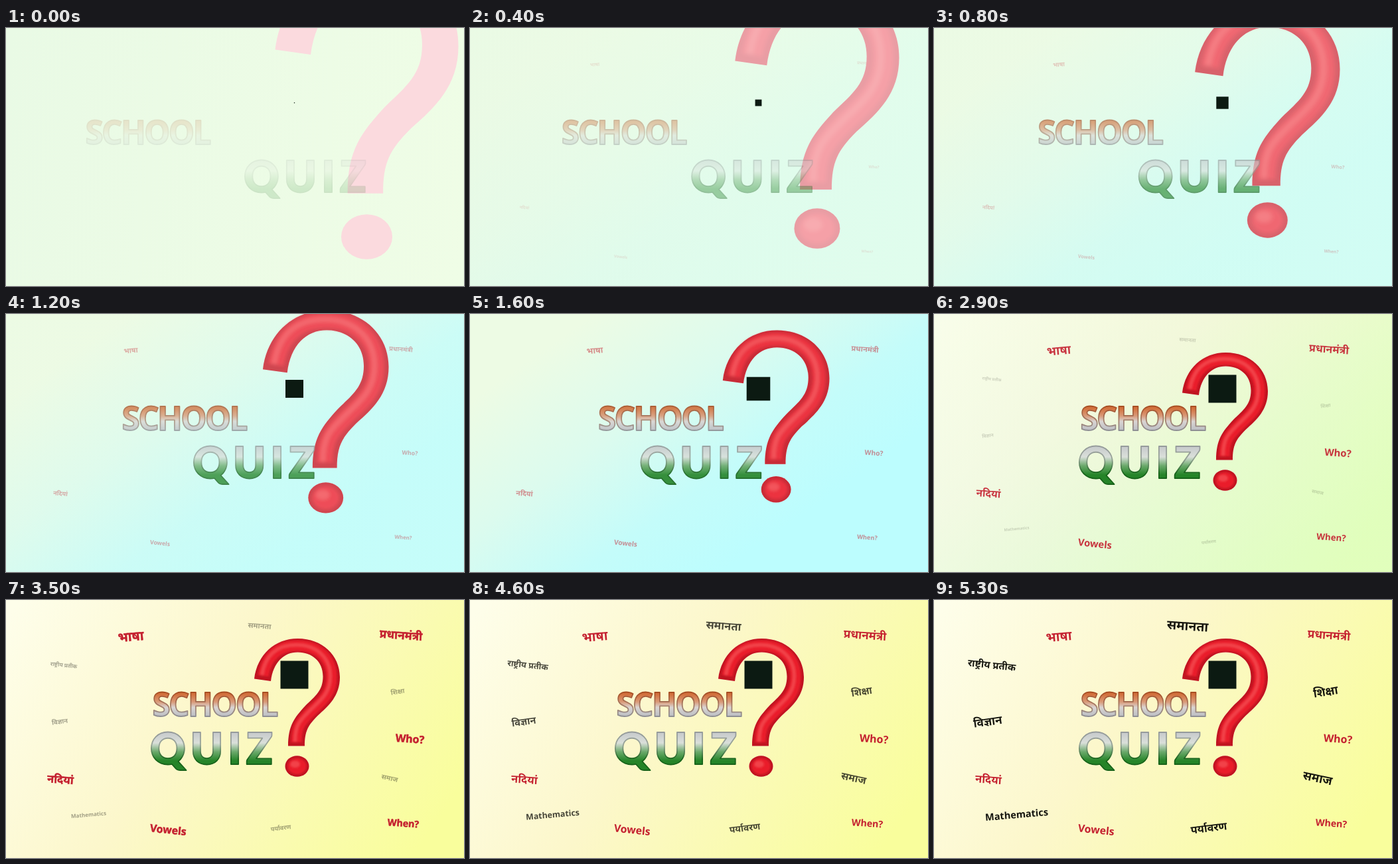
An HTML page for the animation above (5.4 s loop, 690 px wide and 388 px high).

```html
<!DOCTYPE html>
<html lang="en">
<head>
<meta charset="utf-8">
<title>School Quiz</title>
<style>
  html, body { margin: 0; width: 100%; height: 100%; overflow: hidden; }
  body { position: relative; background: linear-gradient(100deg, #e9fae5, #effde6); }
  .bg, svg { position: absolute; inset: 0; width: 100%; height: 100%; }
  #cyan { background: linear-gradient(145deg, #edfbe4 15%, #dcfbee 38%, #c4fcfa 58%, #bcfdfe 75%); }
  #mint { background: linear-gradient(145deg, #effce9 6%, #e4f9f0 34%, #cbfeef 60%, #bfffe9 85%); }
  #sun { background: linear-gradient(125deg, #fefeea 2%, #fcf7cb 42%, #fafbb0 70%, #f9fe9c 92%); }
  text { font-weight: 700; }
  #words text { text-anchor: middle; font-family: "Open Sans", "Noto Sans Devanagari", "Noto Sans", sans-serif; }
  .title { stroke-width: 1.8; stroke-linejoin: round; }
  #school { font-family: "Open Sans", "Noto Sans", sans-serif; }
  #quiz text { font-family: Lato, "Open Sans", sans-serif; font-weight: 900; }
</style>
</head>
<body>
<div class="bg" id="cyan"></div>
<div class="bg" id="mint"></div>
<div class="bg" id="sun"></div>
<svg viewBox="0 0 690 388">
  <defs>
    <linearGradient id="saffron" gradientUnits="userSpaceOnUse" x1="0" y1="138" x2="0" y2="176">
      <stop offset=".1" stop-color="#d2703c"/><stop offset=".4" stop-color="#d99a78"/>
      <stop offset=".62" stop-color="#d9d4d2"/><stop offset="1" stop-color="#b9bcc2"/>
    </linearGradient>
    <linearGradient id="saffronEdge" gradientUnits="userSpaceOnUse" x1="0" y1="138" x2="0" y2="176">
      <stop offset="0" stop-color="#a84a1e"/><stop offset=".6" stop-color="#a58270"/><stop offset="1" stop-color="#8d9096"/>
    </linearGradient>
    <linearGradient id="green" gradientUnits="userSpaceOnUse" x1="0" y1="196" x2="0" y2="250">
      <stop offset="0" stop-color="#c2c5c8"/><stop offset=".35" stop-color="#dadfda"/>
      <stop offset=".6" stop-color="#6aa96a"/><stop offset=".85" stop-color="#258428"/>
    </linearGradient>
    <linearGradient id="greenEdge" gradientUnits="userSpaceOnUse" x1="0" y1="196" x2="0" y2="250">
      <stop offset="0" stop-color="#95999c"/><stop offset=".4" stop-color="#98a498"/><stop offset=".8" stop-color="#17631a"/>
    </linearGradient>
    <filter id="soft" filterUnits="userSpaceOnUse" x="-90" y="-220" width="180" height="260"><feGaussianBlur stdDeviation="1.8"/></filter>
    <g id="shape">
      <path d="M-64.5,-131.5C-60,-168 -33,-192 1,-192C38,-192 64.5,-167 64.5,-134C64.5,-106 48,-91 31,-76C16,-61 11.5,-52 11.5,-30.5H-13.5C-13.5,-61 -4,-73 12.5,-91C28,-106 39,-114 39,-135C39,-158 22,-171.5 1,-171.5C-20,-171.5 -36,-156 -39.5,-128Z"/>
      <ellipse rx="18" ry="15.8"/>
    </g>
    <path id="core" d="M-51,-136C-46,-166 -28,-181.5 1,-181.5C32,-181.5 52,-162 52,-134C52,-108 36,-97 22,-83.5C5,-67 -1,-60 -1,-36"/>
  </defs>
  <g id="words"></g>
  <g id="mark">
    <use href="#shape" fill="#fbdade"/>
    <g id="gloss">
      <use href="#shape" fill="#c01420"/>
      <g filter="url(#soft)" fill="none">
        <use href="#core" stroke="#ea1f2c" stroke-width="16"/>
        <use href="#core" stroke="#f2424a" stroke-width="5" transform="translate(-2 -1)"/>
        <ellipse rx="14" ry="12" fill="#ea1f2c"/>
        <ellipse cx="-3" cy="-3" rx="7" ry="5" fill="#f2424a"/>
      </g>
    </g>
  </g>
  <g id="school"><text class="title" x="220.5" y="175" font-size="49.5" letter-spacing="-2.7" fill="url(#saffron)" stroke="url(#saffronEdge)">SCHOOL</text></g>
  <g id="quiz"><text class="title" x="217" y="247" font-size="66" letter-spacing="7" fill="url(#green)" stroke="url(#greenEdge)">QUIZ</text></g>
  <rect id="badge" x="-21" y="-21" width="42" height="42" fill="#0c1a12"/>
</svg>
<script>
const LOOP = 5400, STEP = 100;
const $ = id => document.getElementById(id);

// text, x, y, angle, font size, anchor
const red = [
  ["भाषा", 188, 55, -5, 19.5], ["प्रधानमंत्री", 595, 53, 4, 17.2], ["Who?", 608.5, 209, 4, 16],
  ["When?", 598.5, 336, 4, 14.2], ["Vowels", 217, 343, 6, 15.8, "start"], ["नदियां", 82, 270, 4, 16.5]
];
const black = [
  ["समानता", 382, 39, 4, 19.4], ["राष्ट्रीय प्रतीक", 87, 98, 6, 14.8], ["विज्ञान", 81, 183, -8, 17.2],
  ["Mathematics", 124.5, 323, -5, 14.5], ["पर्यावरण", 414, 343, -7, 16.2],
  ["शिक्षा", 590, 138, -9, 17.5], ["समाज", 578, 268, 12, 18]
];

function addWords(list, color) {
  return list.map(([label, x, y, angle, size, anchor = "middle"]) => {
    const el = document.createElementNS("http://www.w3.org/2000/svg", "text");
    el.textContent = label;
    el.style.textAnchor = anchor;
    el.setAttribute("font-size", size);
    el.setAttribute("y", size * 0.34);
    el.setAttribute("fill", color);
    el.setAttribute("stroke", color);
    $("words").append(el);
    return { el, place: `translate(${x} ${y}) rotate(${angle})` };
  });
}
const redWords = addWords(red, "#c4202f");
const blackWords = addWords(black, "#15150f");

// Linear interpolation through time, value pairs
function track(t, ...p) {
  if (t <= p[0]) return p[1];
  for (let i = 2; i < p.length; i += 2)
    if (t < p[i]) return p[i - 1] + (p[i + 1] - p[i - 1]) * (t - p[i - 2]) / (p[i] - p[i - 2]);
  return p[p.length - 1];
}

function move(id, transform, opacity = 1) {
  $(id).setAttribute("transform", transform);
  $(id).setAttribute("opacity", opacity);
}

function zoom(words, scale, opacity, stroke) {
  for (const { el, place } of words) {
    el.setAttribute("transform", `${place} scale(${scale})`);
    el.setAttribute("opacity", opacity);
    el.setAttribute("stroke-width", stroke);
  }
}

function draw(t) {
  $("cyan").style.opacity = track(t, 0, 0, 800, 0.58, 1500, 1);
  $("mint").style.opacity = track(t, 1600, 0, 2200, 1);
  $("sun").style.opacity = track(t, 2200, 0, 3400, 1);

  const p = track(t, 0, 0, 2040, 1);
  const q = track(t, 0, 1, 2200, 0);
  const fade = track(t, 0, 0.15, 800, 0.62, 1600, 0.9, 2000, 1);
  move("mark", `translate(${543.5 - 105 * p} ${314 - 64 * p}) scale(${2.14 - 1.14 * p})`);
  $("gloss").setAttribute("opacity", track(t, 0, 0, 800, 0.6, 1600, 0.88, 2000, 1));
  move("school", `translate(${-101 * q} 0)`, fade);
  move("quiz", `translate(${141 * q} 0)`, fade);
  move("badge", `translate(434.5 112.5) scale(${track(t, 0, 0.03, 1900, 1)})`);

  zoom(redWords, track(t, 0, 0.28, 3200, 1), track(t, 0, 0, 3200, 1), t >= 3200 && t < 3800 ? 0.5 : 0);
  zoom(blackWords, track(t, 2400, 0.27, 3500, 0.56, 4600, 0.85, 5300, 1), track(t, 2400, 0, 5200, 1), 0);
}

function tick(now) {
  draw(Math.floor(now % LOOP / STEP) * STEP);
  requestAnimationFrame(tick);
}
draw(0);
requestAnimationFrame(tick);
</script>
</body>
</html>
```
